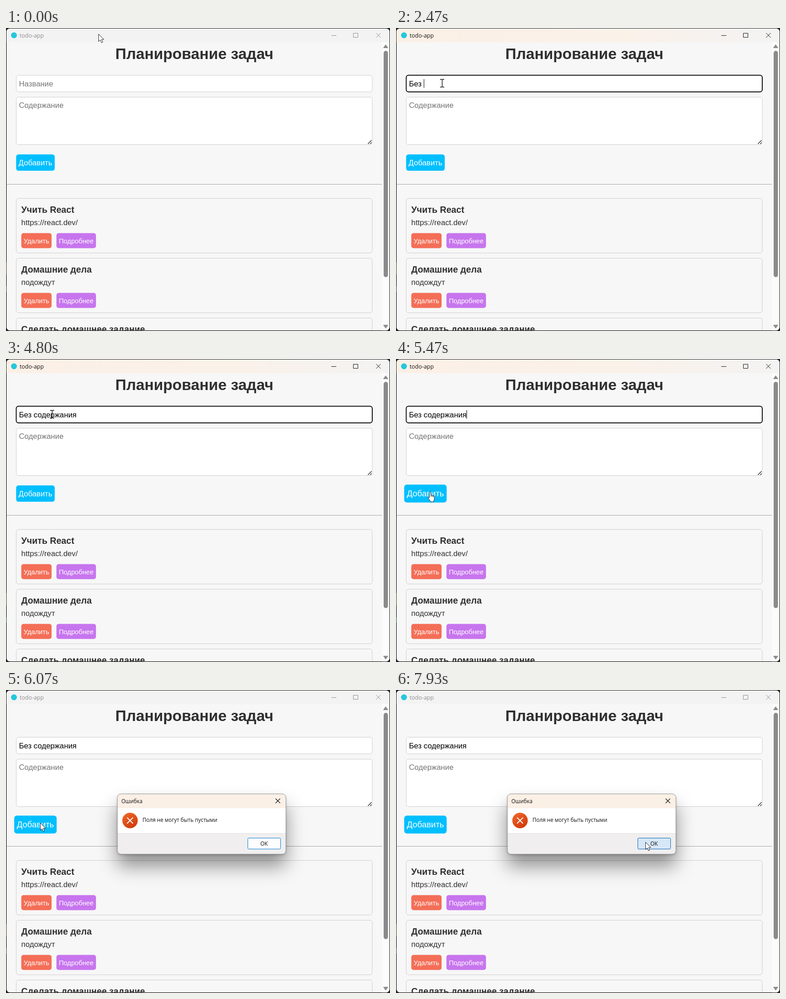
An HTML page that plays this animation: 844x664 px, repeating every 8 s.

```html
<!DOCTYPE html>
<html lang="ru">
<head>
<meta charset="utf-8">
<title>todo-app</title>
<style>
  html, body { margin: 0; width: 100%; height: 100%; overflow: hidden; background: #222226; }
  svg { display: block; width: 844px; height: 664px; font: 16.8px "Liberation Sans", Arial, sans-serif; }
  text { fill: #2f2f2f; white-space: pre; }
  .h1 { font-size: 33.6px; font-weight: bold; }
  .h3 { font-size: 19.66px; font-weight: bold; }
  .hint { fill: #757575; }
  .light { fill: #fff; }
  .small { font-size: 14.7px; }
  .ui { font: 11.7px "Open Sans", "Noto Sans", sans-serif; fill: #111; }
  .box { fill: #fff; stroke: #ccc; }
  .line { fill: none; stroke: #111; }
  #panel { filter: drop-shadow(0 2px 3px rgba(0,0,0,.2)) drop-shadow(0 26px 20px rgba(0,0,0,.42)); }
</style>
</head>
<body>
<svg viewBox="0 0 844 664">
  <defs>
    <linearGradient id="cream">
      <stop stop-color="#fcf0e6"/><stop offset=".6" stop-color="#faf1e9"/><stop offset="1" stop-color="#f3f3f3"/>
    </linearGradient>
    <linearGradient id="alert" x2=".6" y2="1">
      <stop stop-color="#f26a2b"/><stop offset="1" stop-color="#d23c0c"/>
    </linearGradient>
    <clipPath id="window"><rect x="1.3" y="1.3" width="841.4" height="661.4" rx="7"/></clipPath>
    <clipPath id="round"><rect x="245" y="228" width="370" height="131.5" rx="8"/></clipPath>
  </defs>

  <path d="M0 513h1v27h-1z" fill="#7d6a35"/>
  <path d="M0 566h1v12h-1z" fill="#3c7a4a"/>

  <g clip-path="url(#window)">
    <rect width="844" height="664" fill="#f7f7f7"/>
    <rect width="844" height="31" fill="#f3f3f3"/>
    <rect id="tint" width="844" height="31" fill="url(#cream)"/>
    <circle cx="17.5" cy="16" r="6.5" fill="#24c8db"/>
    <text id="caption" class="ui" x="30" y="20.5" style="font-size:12.4px">todo-app</text>
    <path id="controls" class="line" d="M715 16.5h11M763.5 11.5h10v9h-10zM813.5 11l10 10m0-10l-10 10"/>

    <rect x="826.5" y="31" width="17" height="633" fill="#fcfcfc"/>
    <rect x="830" y="50" width="9.5" height="496" rx="4.7" fill="#8b8b8b"/>
    <path d="M829.5 43.5h10l-5-7zM829.5 651h10l-5 7z" fill="#8b8b8b" stroke="#8b8b8b" stroke-linejoin="round"/>

    <text class="h1" x="414" y="68" text-anchor="middle">Планирование задач</text>
    <rect id="field" class="box" x="22.5" y="103.5" width="782.5" height="36.5" rx="5"/>
    <text id="typed" x="28.5" y="127.5"></text>
    <rect id="caret" y="112" width="1" height="19"/>
    <rect class="box" x="22.5" y="151.5" width="782.5" height="104" rx="5"/>
    <path class="line" d="M795.5 254l8-8m-3 8l3-3" stroke-width="1.1"/>
    <text class="hint" x="28.5" y="175">Содержание</text>

    <g id="add">
      <rect x="22.3" y="277" width="84.8" height="35.7" rx="5.2" fill="#00bfff"/>
      <text class="light" x="64.7" y="300.8" text-anchor="middle">Добавить</text>
    </g>
    <path d="M1 342.5H826.5" stroke="#a2a2a2"/>
    <g id="cards"></g>
  </g>

  <g id="dialog">
    <rect id="panel" x="245" y="228" width="370" height="131.5" rx="8" fill="#fff"/>
    <g clip-path="url(#round)">
      <rect x="245" y="228" width="370" height="31" fill="#fbf0e6"/>
      <rect x="245" y="314" width="370" height="46" fill="#f0eeef"/>
      <path d="M245 314.5h370" stroke="#e0dfdf"/>
    </g>
    <rect x="244.8" y="227.8" width="370.4" height="132" rx="8" fill="none" stroke="#777" stroke-opacity=".75"/>
    <text class="ui" x="253.5" y="247.5">Ошибка</text>
    <path class="line" d="M592.5 238l10 10m0-10l-10 10" stroke-width="1.2"/>
    <circle cx="272.6" cy="286" r="17" fill="url(#alert)"/>
    <path d="M266.6 280l12 12m0-12l-12 12" stroke="#fff" stroke-width="1.9" stroke-linecap="round"/>
    <text class="ui" x="300" y="289">Поля не могут быть пустыми</text>
    <rect id="ok" x="531.5" y="324.5" width="72" height="24" rx="2"/>
    <text class="ui" x="567.3" y="341.3" text-anchor="middle" style="font-size:12px">ОК</text>
  </g>

  <g id="pointer">
    <path id="arrow" d="M.5.5V16.6l3.8-3.5 2.6 6.1 2.8-1.2-2.5-5.9h5z" fill="#fff" stroke="#222"/>
    <path id="beam" class="line" d="M-4 -8.5h3.2l1.3 1 1.3-1H5M.5-7.5V7.5M-4 8.5h3.2l1.3-1 1.3 1H5" stroke-width="1.4"/>
    <path id="hand" d="M-1.6 13V1.5a1.6 1.6 0 0 1 3.2 0V7l6 1.5q2.3.7 2.2 3l-.5 4.5q-.3 2.3-1.5 4v2H1.2q-1.4-3-4.6-7-2-2.6-.7-3.4 1-.5 2.5 1.4zM2 7v4M5 8v3.5M7.5 9v3" fill="#fff" stroke="#222"/>
  </g>
</svg>
<script>
const $ = id => document.getElementById(id);
const clamp = v => Math.min(1, Math.max(0, v));
const ramp = (t, start, length) => clamp((t - start) / length);
const smooth = u => u * u * (3 - 2 * u);
const easeOut = u => 1 - (1 - u) ** 3;
const setAll = (id, attrs) => Object.entries(attrs).forEach(([k, v]) => $(id).setAttribute(k, v));

const LOOP = 8000, FPS = 15, BLINK = 530;
const FOCUS = 670, BLUR = 5530, ALERT = 5730, PRESS = 7930;
const PHRASE = 'Без содержания';
const KEY_TIMES = [1930, 2130, 2270, 2470, 2800, 2930, 3000, 3130, 3270, 3470, 3670, 3870, 4000, 4270];

const cardButton = (x, width, color, label) => `
  <rect x="${x}" y="449.5" width="${width}" height="33" rx="5" fill="${color}"/>
  <text class="light small" x="${x + width / 2}" y="471.5" text-anchor="middle">${label}</text>`;

$('cards').innerHTML = [
  ['Учить React', 'https://react.dev/'],
  ['Домашние дела', 'подождут'],
  ['Сделать домашнее задание', '']
].map(([title, note], i) => `<g transform="translate(0 ${i * 131})">
  <rect x="22.5" y="373.5" width="782.5" height="119.5" rx="5" fill="none" stroke="#ccc"/>
  <text class="h3" x="33.6" y="405">${title}</text>
  <text x="33.6" y="432">${note}</text>
  ${cardButton(33.6, 66.6, '#f46e57', 'Удалить')}${cardButton(110.8, 87, '#c775ee', 'Подробнее')}
</g>`).join('');

// Pointer stops: time, x, y
const STOPS = [
  [470, 101, 121], [4800, 101, 121], [5400, 75, 291], [6070, 75, 291], [6530, 391, 321],
  [6670, 406, 320], [6870, 406, 320], [6930, 474, 320], [7400, 548, 333], [LOOP, 548, 333]
];

function pointerAt(t) {
  if (t < 470) {
    const u = smooth(t / 470), v = 1 - u;
    const arc = (a, b, c) => a * v * v + 2 * b * u * v + c * u * u;
    return [arc(203, -120, 101), arc(13, 70, 121)];
  }
  const next = STOPS.findIndex(s => s[0] > t);
  const [t0, x0, y0] = STOPS[next - 1], [t1, x1, y1] = STOPS[next];
  const u = smooth(ramp(t, t0, t1 - t0));
  return [x0 + (x1 - x0) * u, y0 + (y1 - y0) * u];
}

function pointerKind(x, y, t) {
  if (t >= ALERT) return 'arrow';
  if (x > 22 && (y > 103 && y < 140 || y > 151 && y < 256)) return 'beam';
  return x > 18 && x < 111 && y > 275 && y < 315 ? 'hand' : 'arrow';
}

function drawWindow(t) {
  const active = t >= FOCUS && t < ALERT;
  const ink = active ? '#111' : '#8c8c8c';
  $('tint').style.opacity = ramp(t, FOCUS - 60, 300) - ramp(t, ALERT, 250);
  $('caption').style.fill = $('controls').style.stroke = ink;
}

function drawField(t) {
  const focused = t >= FOCUS && t < BLUR;
  const count = KEY_TIMES.filter(k => k <= t).length;
  const text = $('typed');
  text.textContent = count ? PHRASE.slice(0, count) : 'Название';
  text.style.fill = count ? '#000' : '#757575';
  $('field').style.stroke = focused ? '#101010' : '#ccc';
  $('field').style.strokeWidth = focused ? 2 : 1;

  const lastInput = count ? KEY_TIMES[count - 1] : FOCUS;
  const lit = Math.floor((t - lastInput) / BLINK) % 2 === 0;
  $('caret').style.display = focused && lit ? '' : 'none';
  setAll('caret', { x: Math.round(28.6 + (count ? text.getComputedTextLength() : 0)) });
}

function scaleAbout(id, x, y, s) {
  setAll(id, { transform: `translate(${x} ${y}) scale(${s}) translate(${-x} ${-y})` });
}

function drawDialog(t, x, y) {
  const open = easeOut(ramp(t, 5800, 250));
  $('dialog').style.opacity = clamp(open * 1.35);
  scaleAbout('dialog', 368, 265, 0.85 + 0.15 * open);
  const hover = x > 531 && y > 324;
  const [fill, stroke] = t >= PRESS ? ['#d6e7f8', '#0063b1'] : hover ? ['#e0eef9', '#0078d4'] : ['#fdfdfd', '#0078d4'];
  setAll('ok', { fill, stroke });
}

function render(now) {
  const step = Math.floor((now % LOOP + 4) * FPS / 1000) % (LOOP * FPS / 1000);
  const t = Math.round(step * 100 / FPS) * 10;
  const [x, y] = pointerAt(t);
  drawWindow(t);
  drawField(t);
  scaleAbout('add', 64.7, 294.9, 1 + 0.1 * smooth(ramp(t, 5200, 250)));
  drawDialog(t, x, y);
  setAll('pointer', { transform: `translate(${Math.round(x)} ${Math.round(y)})` });
  const kind = pointerKind(x, y, t);
  for (const id of ['arrow', 'beam', 'hand']) $(id).style.display = id === kind ? '' : 'none';
}

const start = performance.now();
(function loop() {
  render(performance.now() - start);
  requestAnimationFrame(loop);
})();
</script>
</body>
</html>
```
